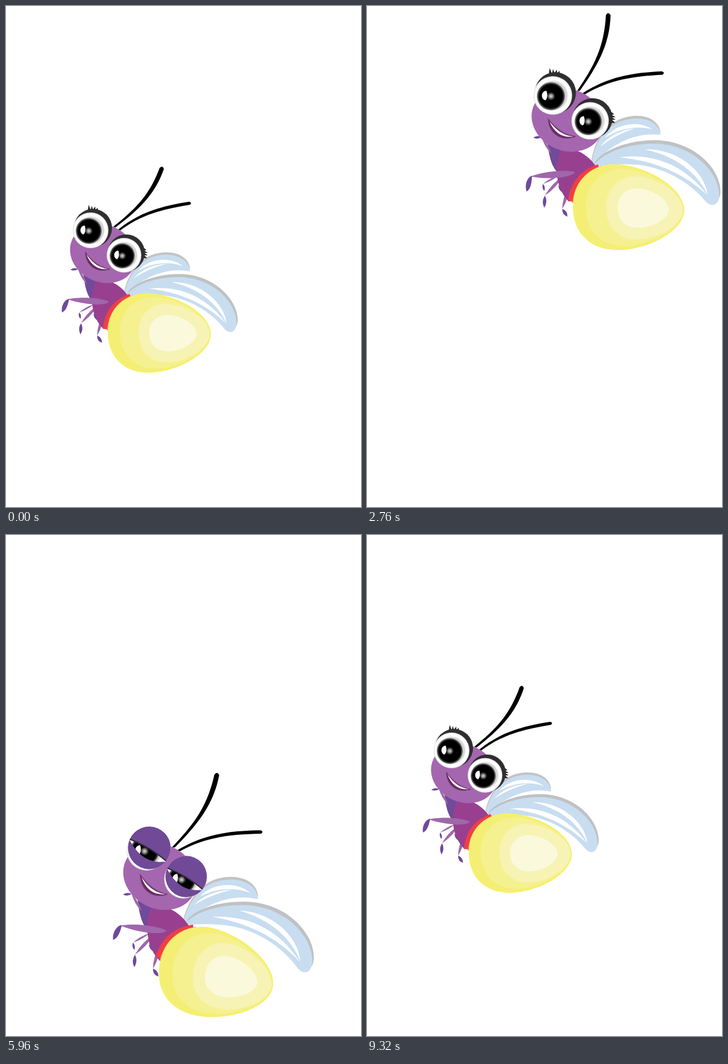
Write an HTML page that moves like this. It is 596 px wide and 842 px high and loops after 9360 ms.

```html
<!DOCTYPE html>
<html lang="en">
<head>
<meta charset="utf-8">
<title>Firefly</title>
<style>
html, body { margin: 0; width: 100%; height: 100%; overflow: hidden; background: #fff; }
svg { display: block; width: 100%; height: 100%; }
</style>
</head>
<body>
<svg id="stage" viewBox="0 0 596 842">
  <defs>
    <radialGradient id="white">
      <stop offset=".72" stop-color="#d4d4d4"/><stop offset=".8" stop-color="#fff"/>
      <stop offset=".93" stop-color="#fff"/><stop offset="1" stop-color="#dcdcdc"/>
    </radialGradient>
    <radialGradient id="pupil">
      <stop offset="0" stop-color="#d8d8d8"/><stop offset=".13" stop-color="#8c8c8c"/>
      <stop offset=".27" stop-color="#111"/><stop offset=".34" stop-color="#000"/>
      <stop offset=".82" stop-color="#000"/><stop offset=".92" stop-color="#444"/>
      <stop offset="1" stop-color="#aaa"/>
    </radialGradient>
    <clipPath id="lidClip"><circle r="32"/></clipPath>
    <path id="egg" d="M-86,-5C-85,-42 -57,-67 -21,-67C28,-66 87,-33 87,2C86,35 28,66 -18,66C-59,66 -87,40 -86,-5Z"/>
    <path id="small" d="M198,486C204,457 222,420 267,418C291,417 308,429 309,446C276,440 240,448 198,486Z"/>
    <path id="big" d="M200,489C214,466 260,453 300,456C350,461 386,498 387,532C387,549 376,552 367,543C345,515 310,493 270,487C245,484 220,486 200,489Z"/>
  </defs>
  <g id="bug">
    <g id="wing2">
      <use href="#small" fill="#c3c3c3" transform="translate(0 -4)"/>
      <use href="#small" fill="#c8ddf0"/>
      <path fill="#fff" d="M222,445C240,424 276,420 297,437C272,428 245,432 222,445ZM214,458C226,444 245,435 270,433C248,439 230,447 214,458Z"/>
    </g>
    <g id="wing1">
      <use href="#big" fill="#bfc1c3" transform="translate(2 -5)"/>
      <use href="#big" fill="#c8ddf0"/>
      <path fill="#fff" d="M278,464C325,463 366,497 370,533C355,500 325,475 278,464ZM240,475C290,469 337,488 369,533C332,498 290,481 240,475Z"/>
    </g>
    <path fill="#704a9b" d="M130,450C132,470 136,490 148,499L162,460Z"/>
    <g id="legs"></g>
    <path fill="#98408f" d="M150,463C165,456 190,464 207,490C185,497 167,517 164,543C146,527 138,492 150,463Z"/>
    <g id="belly">
      <path fill="none" stroke="#ee3f45" stroke-width="9" d="M209,488Q171,502 167,543"/>
      <path fill="none" stroke="#ff6f58" stroke-width="4" d="M213,488Q176,502 171,545"/>
      <g id="eggs"></g>
    </g>
    <g id="arm"></g>
    <g id="head">
      <path id="antA" d="M180,371C215,343 240,320 258,272Q263,267 265,274C250,318 220,345 184,372Z"/>
      <path id="antB" d="M188,376C225,346 262,336 307,329Q313,330 309,334C265,341 228,350 192,377Z"/>
      <ellipse fill="#a466ae" rx="57" ry="48" transform="translate(163 416) rotate(25)"/>
      <path fill="#682b60" stroke="#7a4180" d="M133,413C134,437 152,450 175,442C158,440 145,430 133,413Z"/>
      <path fill="#fff" d="M135,417C145,432 157,440 171,442C155,444 142,436 135,417Z"/>
      <g id="eyes"></g>
    </g>
  </g>
</svg>
<script>
const $ = id => document.getElementById(id);
const LOOP = 9360, STEP = 40;
const LIGHT = '#a067ab', DARK = '#6d4a9b';

// Pointed limb segment between two points
function leaf(x1, y1, x2, y2, w, fill) {
  const len = Math.hypot(x2 - x1, y2 - y1);
  const nx = -(y2 - y1) / len * w, ny = (x2 - x1) / len * w;
  const mx = (x1 + x2) / 2, my = (y1 + y2) / 2;
  return `<path fill="${fill}" d="M${x1},${y1}Q${mx + nx},${my + ny} ${x2},${y2}Q${mx - nx},${my - ny} ${x1},${y1}Z"/>`;
}

const limb = (x1, y1, x2, y2, x3, y3, w) =>
  leaf(x1, y1, x2, y2, w, LIGHT) + leaf(x2, y2, x3, y3, w + .5, DARK);

$('legs').innerHTML =
  leaf(136, 468, 121, 442, 4, LIGHT) + leaf(121, 442, 108, 443, 4, DARK) +
  limb(148, 501, 123, 515, 125, 526, 3) +
  limb(154, 503, 126, 533, 125, 552, 5) +
  limb(154, 509, 147, 517, 153, 528, 3) +
  limb(163, 520, 153, 554, 161, 566, 5);

$('arm').innerHTML =
  `<path fill="${LIGHT}" d="M104,493C122,488 160,490 173,497C166,505 130,502 104,493Z"/>
   <path fill="${DARK}" d="M106,492C98,493 92,505 94,515C101,512 104,503 106,492Z"/>`;

const layer = (x, sx, sy, fill, extra = '') =>
  `<use href="#egg" fill="${fill}" ${extra} transform="translate(${x} 550) scale(${sx} ${sy})"/>`;

$('eggs').innerHTML =
  layer(257, .99, .99, '#f4ef74', 'stroke="#f6f06a" stroke-width="2"') +
  layer(266, .87, .9, '#f5f191') +
  layer(282, .69, .74, '#f7f3b4') +
  layer(280, .46, .46, '#fbf9dc');

const eye = (x, y, size, lashes) =>
  `<g transform="translate(${x} ${y}) scale(${size})">
    <path class="lash" fill="#222" d="${lashes}"/>
    <circle class="cap" r="32" fill="#2f2f31"/>
    <circle cx="-4" cy="4" r="30" fill="url(#white)"/>
    <circle cx="-7" cy="5" r="22" fill="url(#pupil)"/>
    <path fill="#fff" d="M-14,-4C-23,-3 -23,9 -16,11C-12,8 -12,0 -14,-4Z"/>
    <g class="lid" clip-path="url(#lidClip)">
      <g transform="rotate(30)">
        <path class="skin" fill="#704a97" fill-rule="evenodd"/>
        <path class="rim" fill="none" stroke="#3a2b40" stroke-width="2"/>
      </g>
    </g>
  </g>`;

$('eyes').innerHTML =
  eye(146, 373, 1, 'M-9,-29L-7,-39L-4,-30L-2,-37L0,-31L4,-36L4,-30L8,-34L8,-28Z') +
  eye(202, 415, .97, 'M30,-9L35,-5L31,-4L37,0L31,0L37,4L31,4L36,9L28,9Z');

// Waist position: time, x, y
const path = [
  [0, 205, 490], [980, 261, 402], [1320, 300, 343], [1920, 360, 264],
  [2350, 377, 254], [2760, 384, 272], [2900, 385, 281], [3860, 372, 423],
  [4680, 345, 567], [5780, 311, 651], [5960, 305, 657], [6740, 237, 550],
  [7700, 173, 396], [7880, 168, 391], [8660, 182, 431], [9320, 205, 475]
];

// Pose: time, size, head, antenna A, antenna B, wing turn, wing size, small wing, belly, arm
const pose = [
  [0, 1, 0, 0, 0, 0, 1, 0, 0, 0],
  [1320, 1.03, -2, -10, 6, -1, 1.03, -2, 0, 0],
  [2760, 1.08, -2.5, -15, 8.5, -1, 1.05, -4, 2, -9],
  [4680, 1.14, -1, 0, 0, -2.5, .98, 1, 8.5, -3],
  [5960, 1.12, 1, -9, 7, 3, 1.04, 2, 12, 3],
  [7880, 1.045, 1, -11, 7.5, 4, 1.06, 3, 3, 0],
  [9320, 1, 0, -1, 0, 0, 1, 0, 0, 0]
];

// Smooth curve through unevenly spaced keys
function sample(keys, t) {
  const last = keys.length - 1;
  t = Math.min(t, keys[last][0]);
  let i = 0;
  while (i < last - 1 && t >= keys[i + 1][0]) i++;
  const gap = j => keys[j + 1][0] - keys[j][0];
  const slope = (j, c) => (keys[j + 1][c] - keys[j][c]) / gap(j);
  const tangent = (j, c) => {
    if (j === 0) return slope(0, c);
    if (j === last) return slope(last - 1, c);
    const a = gap(j - 1), b = gap(j);
    return (slope(j - 1, c) * b + slope(j, c) * a) / (a + b);
  };
  const h = gap(i), u = (t - keys[i][0]) / h, v = 1 - u;
  return keys[i].slice(1).map((p, n) => {
    const c = n + 1;
    return p * (1 + 2 * u) * v * v + keys[i + 1][c] * u * u * (3 - 2 * u) +
      h * u * v * (tangent(i, c) * v - tangent(i + 1, c) * u);
  });
}

const clamp = x => Math.max(0, Math.min(1, x));
const turn = (id, a, x, y) => $(id).setAttribute('transform', `rotate(${a} ${x} ${y})`);
const each = (sel, fn) => document.querySelectorAll(sel).forEach(fn);

function setLids(k) {
  const top = -70 + 68 * k, low = 70 - 42 * k;
  const edge = `M-33,4Q0,${top} 33,4`;
  each('.skin', e => e.setAttribute('d', `M-40,-40H40V40H-40Z${edge}Q4,${low} -33,4Z`));
  each('.rim', e => e.setAttribute('d', edge));
  each('.lid', e => e.setAttribute('display', k > 0 ? 'inline' : 'none'));
  each('.lash', e => e.setAttribute('display', k > 0 ? 'none' : 'inline'));
  each('.cap', e => e.setAttribute('fill', k > .5 ? '#fff' : '#2f2f31'));
}

function draw(t) {
  const [x, y] = sample(path, t);
  const [size, head, antA, antB, wing, span, wing2, belly, arm] = sample(pose, t);
  $('bug').setAttribute('transform', `translate(${x} ${y}) scale(${size}) translate(-205 -490)`);
  turn('head', head, 150, 460);
  turn('antA', antA, 182, 371);
  turn('antB', antB, 190, 376);
  $('wing1').setAttribute('transform',
    `translate(203 489) rotate(${wing}) scale(${span}) translate(-203 -489)`);
  turn('wing2', wing2, 200, 486);
  turn('belly', belly, 190, 512);
  turn('arm', arm, 171, 498);
  setLids(Math.min(clamp((t - 5720) / 160), clamp((6260 - t) / 160)));
}

const start = performance.now();
function tick() {
  const t = (performance.now() - start) % LOOP;
  draw(Math.floor(t / STEP) * STEP);
  requestAnimationFrame(tick);
}
tick();
</script>
</body>
</html>
```
